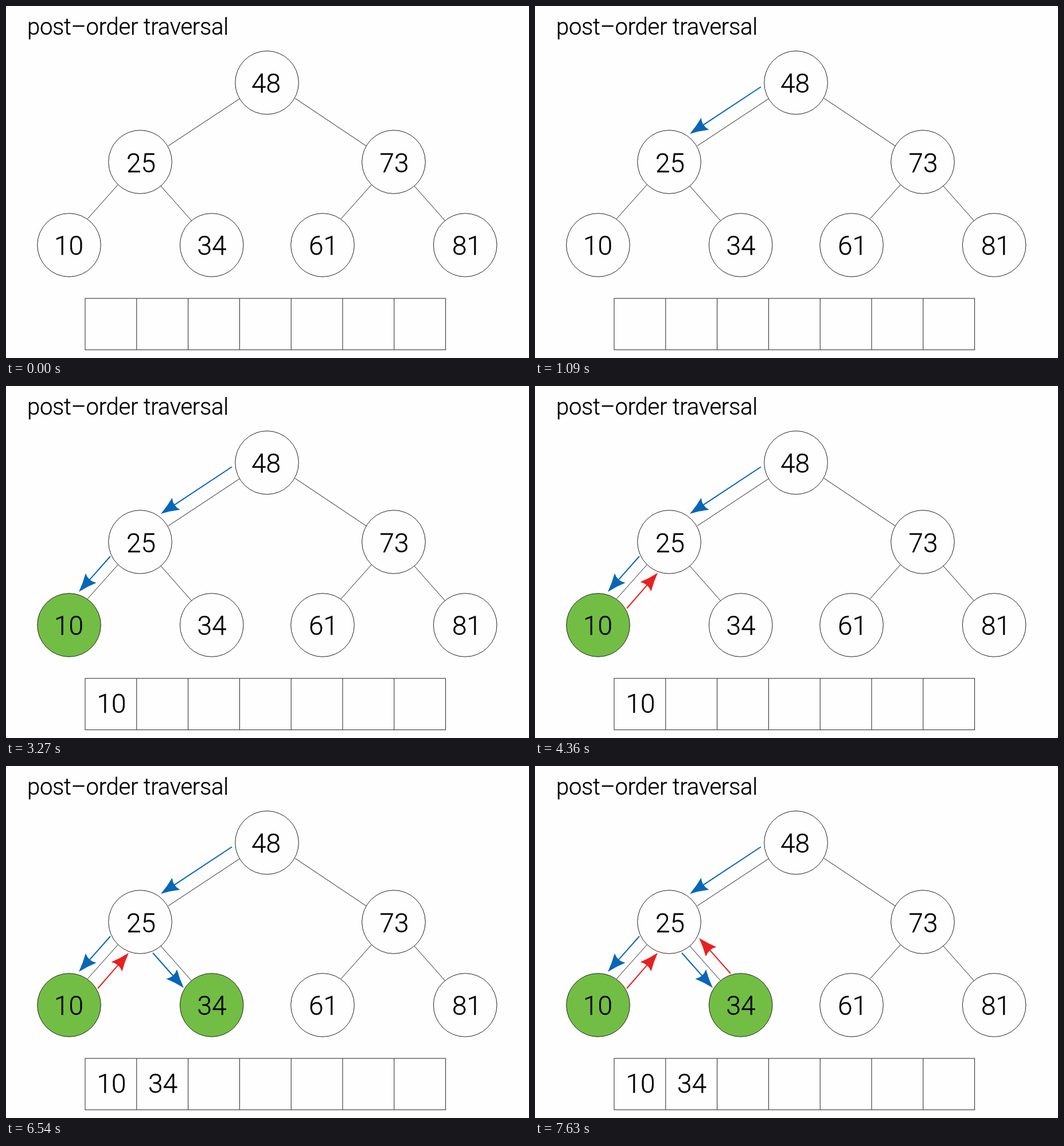
An HTML page that plays this animation: 912 px wide and 614 px high, repeating every 8000 ms.

```html
<!DOCTYPE html>
<html lang="en">
<head>
<meta charset="utf-8">
<title>Post-order traversal</title>
<style>
  html, body { margin: 0; width: 100%; height: 100%; overflow: hidden; background: #fefefe; }
  svg { display: block; width: 912px; height: 614px; }
  text { font: 300 46px Roboto, Inter, sans-serif; fill: #000; stroke: #000; stroke-width: 0.4; text-anchor: middle; }
  .title { font-size: 40px; letter-spacing: -0.25px; text-anchor: start; }
  .outline { fill: none; stroke: #222; stroke-width: 1; }
</style>
</head>
<body>
<svg id="stage" viewBox="0 0 912 614">
  <text class="title" x="37" y="50">post–order traversal</text>
</svg>
<script>
const LOOP = 8000, STEP = 1090;
const BLUE = '#0666b8', RED = '#e8201f', GREEN = '#72be44';
const stage = document.getElementById('stage');

function add(tag, attributes, text = '') {
  const element = document.createElementNS('http://www.w3.org/2000/svg', tag);
  for (const [name, value] of Object.entries(attributes)) element.setAttribute(name, value);
  element.textContent = text;
  return stage.appendChild(element);
}

// Parts that appear at a given step, hidden before it.
const timed = [];
const reveal = (step, element) => timed.push({ step, element });

function arrow(step, color, x1, y1, x2, y2) {
  const length = Math.hypot(x2 - x1, y2 - y1);
  const angle = Math.atan2(y2 - y1, x2 - x1) * 180 / Math.PI;
  const transform = `translate(${x2} ${y2}) rotate(${angle})`;
  reveal(step, add('path', { d: `M${-length} 0H-27`, transform, stroke: color, 'stroke-width': 2 }));
  reveal(step, add('path', {
    d: 'M0 0Q-17 5-32 12.5Q-25 0-32-12.5Q-17-5 0 0Z', transform, fill: color
  }));
}

function node(value, x, y, textX, baseline, visitStep) {
  const circle = { cx: x, cy: y, r: 55.3 };
  if (visitStep) reveal(visitStep, add('circle', { ...circle, fill: GREEN }));
  add('circle', { ...circle, class: 'outline' });
  add('text', { x: textX, y: baseline }, value);
}

node(48, 455, 133.7, 453.5, 150.5);
node(25, 234, 272, 235.5, 289.5);
node(73, 676, 272, 677, 289.5);
node(10, 110, 417, 109.5, 433.5, 3);
node(34, 358.7, 417, 359, 433.5, 6);
node(61, 552, 417, 553.5, 433.5);
node(81, 800.7, 417, 803.5, 433.5);

add('path', {
  class: 'outline',
  d: 'M407 162L283 244M504 161L628 244M195 312L142 371.5M270 314L324 375' +
     'M637 312L584 371.5M712 314L766 375'
});

const cell = 89.8;
add('rect', { class: 'outline', x: 138, y: 510, width: 7 * cell, height: 89.7 });
for (let i = 1; i < 7; i++) add('path', { class: 'outline', d: `M${138 + i * cell} 510v89.7` });
reveal(3, add('text', { x: 184, y: 570.2 }, '10'));
reveal(6, add('text', { x: 273.5, y: 570.2 }, '34'));

arrow(1, BLUE, 394, 141, 270, 223);
arrow(2, BLUE, 182, 297, 127, 359);
arrow(4, RED, 160, 388, 214, 326);
arrow(5, BLUE, 256, 326, 310, 387);
arrow(7, RED, 341, 362, 286, 300);

function draw(now) {
  const step = Math.floor(now % LOOP / STEP);
  for (const part of timed) part.element.style.display = step >= part.step ? '' : 'none';
  requestAnimationFrame(() => draw(performance.now()));
}
draw(performance.now());
</script>
</body>
</html>
```
